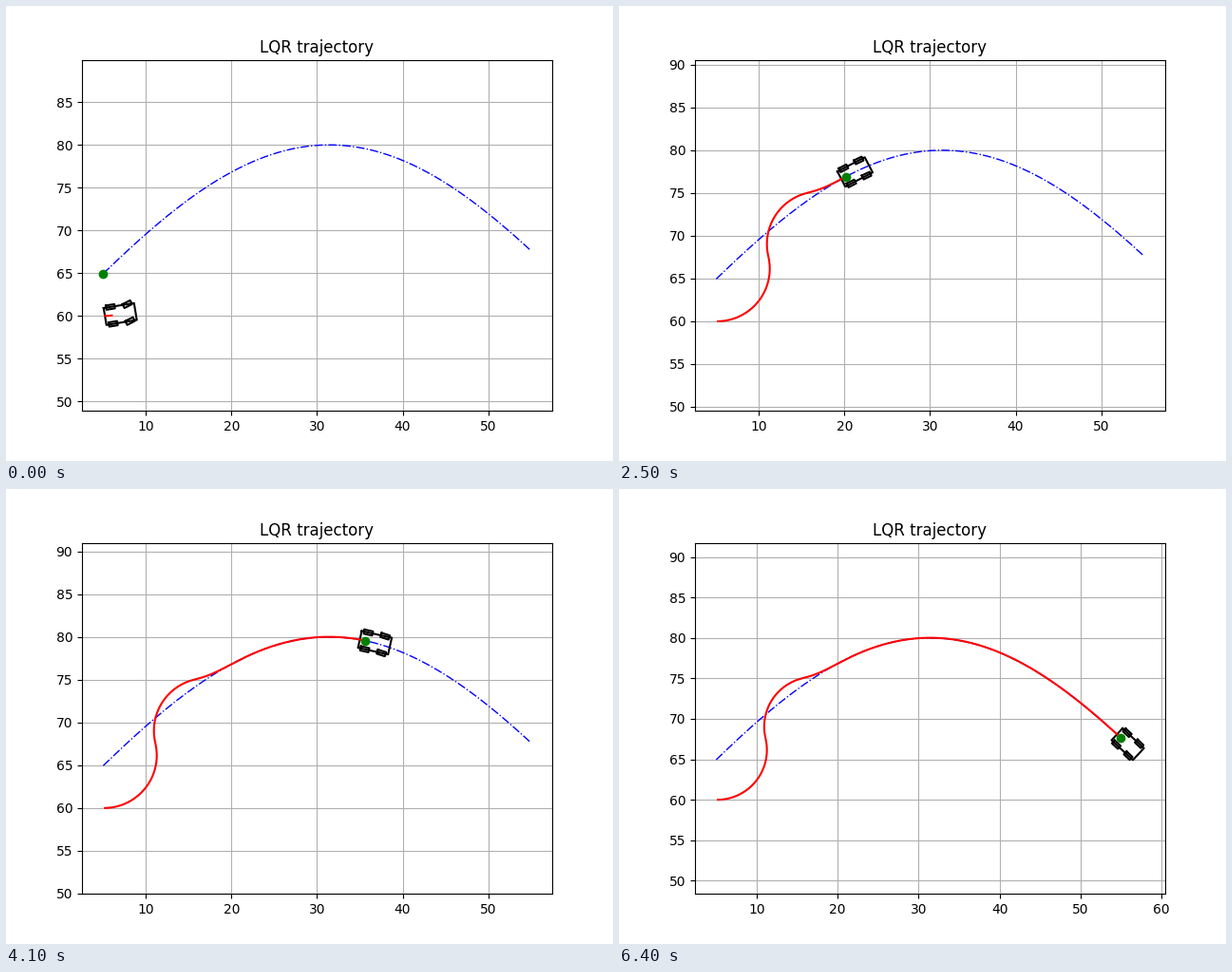
A matplotlib script that plays this animation: 639 px wide and 479 px high, repeating every 6500 ms.

```python
import math

import matplotlib.pyplot as plt
import numpy as np
from matplotlib.animation import FuncAnimation

FRAMES, INTERVAL, STEPS = 65, 100, 5    # simulation steps per frame
V, DT, MAX_STEER = 2.0, 0.1, math.pi / 10

# car geometry, measured from the rear axle
WHEELBASE, WIDTH, FRONT, BACK = 2.0, 2.0, 2.8, 0.8
WHEEL_R, WHEEL_W = 0.5, 0.5

Q, R = 3 * np.eye(3), 2 * np.eye(2)

path_x = np.linspace(5, 55, 1000)
path_y = 60 + 20 * np.sin(path_x / 20)
slope = np.cos(path_x / 20)
path_yaw = np.arctan(slope)
path_k = -np.sin(path_x / 20) / 20 / (1 + slope**2) ** 1.5


def feedback(state, ref, steer):
    """Steering correction of the discrete LQR around a path point."""
    yaw = ref[2]
    A = np.array([[1, 0, -V * DT * math.sin(yaw)],
                  [0, 1, V * DT * math.cos(yaw)],
                  [0, 0, 1]])
    B = np.array([[DT * math.cos(yaw), 0],
                  [DT * math.sin(yaw), 0],
                  [DT * math.tan(steer) / WHEELBASE,
                   V * DT / (WHEELBASE * math.cos(steer) ** 2)]])
    P = Q
    for _ in range(100):
        K = np.linalg.solve(R + B.T @ P @ B, B.T @ P @ A)
        new = Q + A.T @ P @ (A - B @ K)
        done = abs(new - P).max() < 1e-4
        P = new
        if done:
            break
    K = np.linalg.solve(R + B.T @ P @ B, B.T @ P @ A)
    return -(K @ (state - ref))[1]


def simulate(count):
    """Rows of x, y, yaw, steer and target index after each step."""
    x, y, yaw = 5.0, 60.0, 0.0
    rows = []
    for _ in range(count):
        i = int(np.argmin(np.hypot(path_x - x, path_y - y)))
        ff = math.atan(WHEELBASE * path_k[i])
        ref = np.array([path_x[i], path_y[i], path_yaw[i]])
        steer = ff + feedback(np.array([x, y, yaw]), ref, ff)
        steer = max(-MAX_STEER, min(MAX_STEER, steer))
        x += V * math.cos(yaw) * DT
        y += V * math.sin(yaw) * DT
        yaw += V / WHEELBASE * math.tan(steer) * DT
        rows.append((x, y, yaw, steer, i))
    return rows


def box(x0, x1, half):
    return np.array([[x0, x1, x1, x0, x0], [half, half, -half, -half, half]])


def rotate(points, angle):
    c, s = math.cos(angle), math.sin(angle)
    return np.array([[c, -s], [s, c]]) @ points


def draw_car(x, y, yaw, steer):
    wheel = box(-WHEEL_R, WHEEL_R, WHEEL_W / 2)
    parts = [box(-BACK, FRONT, WIDTH / 2)]
    for side in (-WIDTH / 2, WIDTH / 2):
        parts.append(wheel + [[0], [side]])
        parts.append(rotate(wheel, steer) + [[WHEELBASE], [side]])
    for part in parts:
        px, py = rotate(part, yaw) + [[x], [y]]
        ax.plot(px, py, color="black")


run = simulate(FRAMES * STEPS)
trail_x = [row[0] for row in run]
trail_y = [row[1] for row in run]

fig, ax = plt.subplots(figsize=(6.39, 4.79), dpi=100)


def update(frame):
    n = (frame + 1) * STEPS
    x, y, yaw, steer, target = run[n - 1]
    ax.cla()
    ax.plot(path_x, path_y, "-.b", linewidth=1.0)
    draw_car(x, y, yaw, steer)
    ax.plot(trail_x[:n], trail_y[:n], "-r")
    ax.plot(path_x[target], path_y[target], "go")
    ax.set_title("LQR trajectory")
    ax.axis("equal")
    ax.grid(True)


anim = FuncAnimation(fig, update, frames=FRAMES, init_func=lambda: None,
                     interval=INTERVAL, repeat=True, repeat_delay=0)
plt.show()
```
